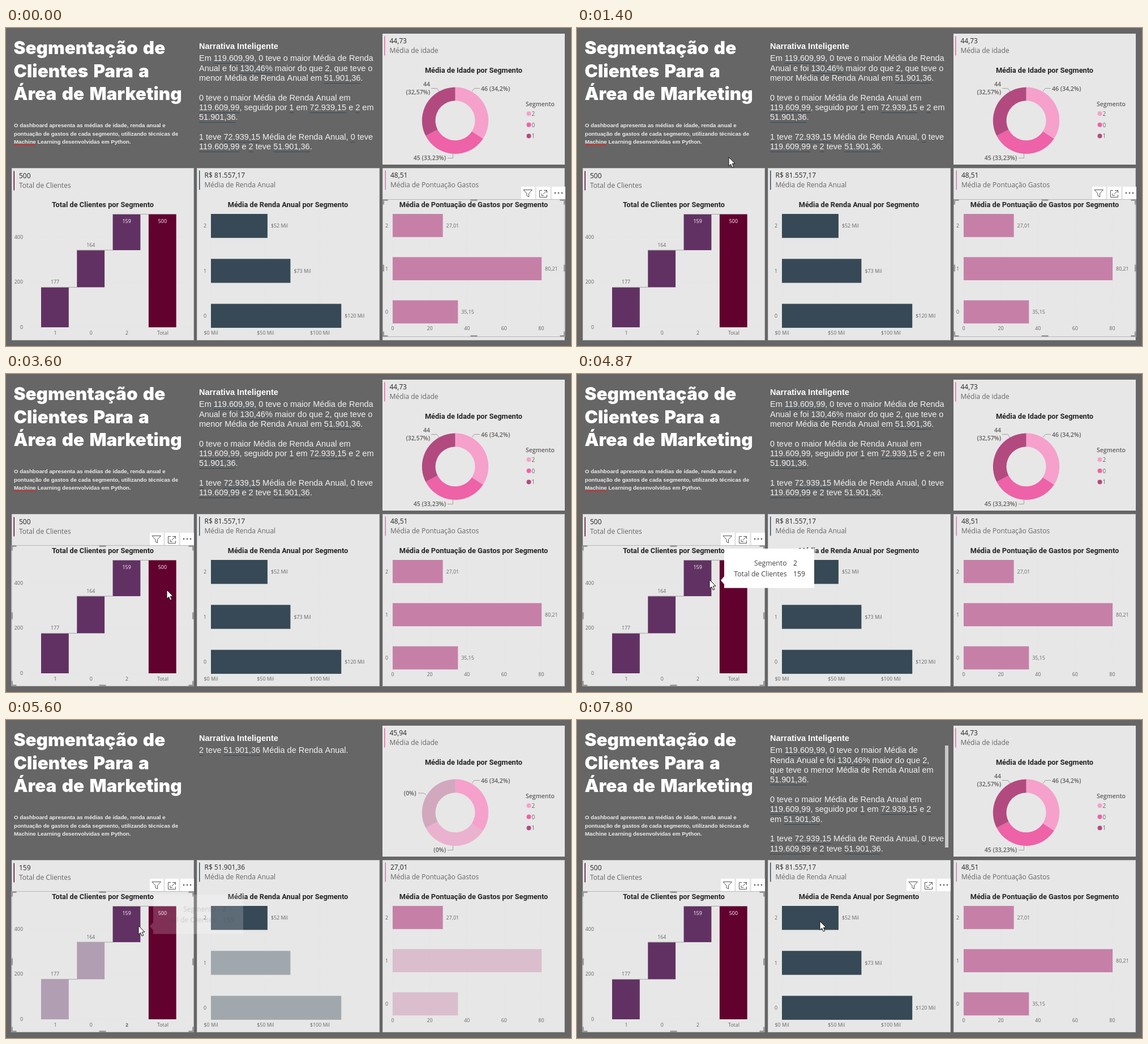
An HTML page with a canvas that plays this animation: 998 by 561 pixels, repeating every 8 s.

```html
<!DOCTYPE html>
<html lang="pt">
<head>
<meta charset="utf-8">
<title>Segmentação de Clientes</title>
<style>
html, body { margin: 0; width: 100%; height: 100%; overflow: hidden; background: #666; }
canvas { display: block; }
</style>
</head>
<body>
<canvas id="stage" width="998" height="561"></canvas>
<script>
const ctx = document.getElementById('stage').getContext('2d');
const LOOP = 8000, STEP = 1000 / 15, FADED = 0.4;
const SANS = '"Liberation Sans", Arial, sans-serif';
const UI = '"Open Sans", "Noto Sans", sans-serif';
const HEAD = '700 12.8px Roboto, sans-serif';
const AXIS = `8.9px ${UI}`, CARD = `12px ${UI}`, BOLD = `600 10.5px ${UI}`;
const PLUM = '#623163', WINE = '#62002e', SLATE = '#374956', MAUVE = '#c680a8';
const GREY = '#666', DARK = '#252423', PANEL = '#e7e7e7';

const NARRATIVE = {
  wide: ['Em 119.609,99, 0 teve o maior Média de Renda', 'Anual e foi 130,46% maior do que 2, que teve o',
    'menor Média de Renda Anual em 51.901,36.', '', '0 teve o maior Média de Renda Anual em',
    '119.609,99, seguido por 1 em 72.939,15 e 2 em', '51.901,36.', '',
    '1 teve 72.939,15 Média de Renda Anual, 0 teve', '119.609,99 e 2 teve 51.901,36.'],
  single: ['2 teve 51.901,36 Média de Renda Anual.'],
  narrow: ['Em 119.609,99, 0 teve o maior Média de', 'Renda Anual e foi 130,46% maior do que 2,',
    'que teve o menor Média de Renda Anual em', '51.901,36.', '', '0 teve o maior Média de Renda Anual em',
    '119.609,99, seguido por 1 em 72.939,15 e 2', 'em 51.901,36.', '',
    '1 teve 72.939,15 Média de Renda Anual, 0 teve', '119.609,99 e 2 teve 51.901,36.']
};

// time, x, y of the pointer tip
const POINTER = [[267, 1010, 561], [670, 620, 190], [1070, 500, 283], [1200, 500, 283], [1400, 268, 228],
  [2133, 268, 228], [2530, 284, 381], [4333, 284, 381], [4470, 234, 363], [7000, 234, 363], [7800, 429, 355]];

const within = (t, a, b) => t >= a && t < b;
const ramp = (t, a, b) => Math.max(0, Math.min(1, (t - a) / (b - a)));

function rect(x, y, w, h, color) {
  ctx.fillStyle = color;
  ctx.fillRect(x, y, w, h);
}

function text(str, x, y, font, color = GREY, align = 'left') {
  ctx.font = font;
  ctx.fillStyle = color;
  ctx.textAlign = align;
  ctx.fillText(str, x, Math.round(y));
}

function line(points, color, width = 1, dash = []) {
  ctx.beginPath();
  points.forEach(([x, y]) => ctx.lineTo(x, y));
  ctx.strokeStyle = color;
  ctx.lineWidth = width;
  ctx.setLineDash(dash);
  ctx.stroke();
  ctx.setLineDash([]);
}

function dot(x, y, r, color) {
  ctx.beginPath();
  ctx.arc(x, y, r, 0, Math.PI * 2);
  ctx.fillStyle = color;
  ctx.fill();
}

function withAlpha(alpha, draw) {
  ctx.save();
  ctx.globalAlpha = alpha;
  draw();
  ctx.restore();
}

function panel(x, y, w, h) {
  rect(x, y, w, h, PANEL);
  ctx.strokeStyle = '#c9c9c9';
  ctx.lineWidth = 1;
  ctx.strokeRect(x + 0.5, y + 0.5, w - 1, h - 1);
}

function card(x, y, value, label, color, busy) {
  rect(x - 9.5, y - 13, 1.5, 34, color);
  text(value, x, y, CARD, DARK);
  text(label, x, y + 16.5, CARD);
  if (busy) dot(x - 2.5, y - 3.5, 1.2, GREY);
}

function header(t) {
  const black = '900 31.5px Inter, "Liberation Sans", sans-serif';
  ctx.wordSpacing = '3px';
  ['Segmentação de', 'Clientes Para a', 'Área de Marketing'].forEach((s, i) =>
    text(s, 13.5, 46 + i * 40.5, black, '#fff'));
  ctx.wordSpacing = '0px';
  ['O dashboard apresenta as médias de idade, renda anual e',
    'pontuação de gastos de cada segmento, utilizando técnicas de',
    'Machine Learning desenvolvidas em Python.'].forEach((s, i) =>
    text(s, 14, 175.4 + i * 14.4, `700 9.7px ${SANS}`, '#ececec'));
  if (t < 5200) {
    const wave = Array.from({ length: 20 }, (_, i) => [14 + i * 2, 206 + i % 2]);
    line(wave, '#e02828', 1.4);
  }
}

function narrative(t) {
  const mode = t < 5270 ? 'wide' : t < 6800 ? 'single' : 'narrow';
  text('Narrativa Inteligente', 341, 36.5, `700 14.55px ${SANS}`, '#fff');
  NARRATIVE[mode].forEach((str, i) => {
    const y = Math.round(58.4 + i * 17.32);
    let x = 341;
    str.split(/(\d[\d.,]*\d%?|\d)/).forEach((part, k) => {
      text(part, x, y, `14.5px ${SANS}`, '#f2f2f2');
      const w = ctx.measureText(part).width;
      if (k % 2) rect(x, y + 4, w, 1, '#374956');
      x += w;
    });
  });
  if (mode === 'narrow') rect(650, 45, 6, 180, '#c8c8c8');
}

function donut(t, dim) {
  rect(665, 10, 322, 231, PANEL);
  const filtered = within(t, 5470, 7070), busy = within(t, 6730, 7070);
  card(677.5, 27.4, filtered ? '45,94' : '44,73', 'Média de idade', '#ee62a8', busy);
  if (busy) dot(675, 81, 1.2, GREY);
  text('Média de Idade por Segmento', 826, 79, HEAD, DARK, 'center');

  const parts = [['2', 0.342, '#f5a1cb'], ['0', 0.3323, '#ee62a8'], ['1', 0.3257, '#b24a80']];
  let angle = -Math.PI / 2;
  parts.forEach(([name, share, color], i) => {
    const end = angle + share * Math.PI * 2;
    withAlpha(i ? dim : 1, () => {
      ctx.beginPath();
      ctx.arc(793.5, 163.3, 58.7, angle, end);
      ctx.arc(793.5, 163.3, 35, end, angle, true);
      ctx.fillStyle = color;
      ctx.fill();
    });
    angle = end;
    dot(923.5, 151 + i * 19.7, 4, color);
    text(name, 928.5, 155 + i * 19.7, `10px ${UI}`);
  });
  text('Segmento', 918, 138, BOLD, '#605e5c');

  const none = within(t, 5270, 6800), leader = '#a0a0a0';
  text('46 (34,2%)', 839, 110.5, BOLD, '#605e5c');
  line([[823, 112], [827, 106.5], [837, 106.5]], leader);
  text(none ? '(0%)' : '45 (33,23%)', 777, 233, BOLD, '#605e5c', 'right');
  line([[780, 229.5], [789.5, 229.5], [789.5, 222]], leader);
  if (none) {
    text('(0%)', 724.5, 133, BOLD, '#605e5c', 'right');
    line([[728, 129], [738, 129], [742, 132]], leader);
  } else {
    text('44', 749, 103, BOLD, '#605e5c', 'right');
    text('(32,57%)', 749, 117, BOLD, '#605e5c', 'right');
    line([[751, 106.5], [761, 106.5], [765, 112]], leader);
  }
}

function waterfall(t) {
  panel(10, 247, 322, 304);
  const filtered = within(t, 5470, 7070), picked = within(t, 5200, 6730);
  card(23, 265.4, filtered ? '159' : '500', 'Total de Clientes', WINE, within(t, 6730, 7070));
  text('Total de Clientes por Segmento', 171, 315.5, HEAD, DARK, 'center');
  const yOf = v => 528 - v * 0.399;
  [0, 200, 400].forEach(v => {
    text(v, 30, yOf(v) + 3.2, AXIS, GREY, 'right');
    line([[40, yOf(v)], [326, yOf(v)]], '#dedede', 1, [1, 3]);
  });
  let base = 0;
  [['1', 177, PLUM], ['0', 164, PLUM], ['2', 159, PLUM], ['Total', 500, WINE]].forEach(([name, value, color], i) => {
    const x = 62 + i * 63.3, from = i === 3 ? 0 : base, top = yOf(from + value), inside = i > 1;
    withAlpha(picked && i < 2 ? FADED : 1, () => rect(x, top, 48.8, value * 0.399, color));
    text(value, x + 24.5, inside ? top + 15 : top - 6, AXIS, inside ? '#fff' : GREY, 'center');
    text(name, x + 25, 541, (picked && i === 2 ? '700 ' : '') + AXIS, GREY, 'center');
    if (i < 3) line([[x, top], [x + 63.3, top]], '#a6a6a6', 1);
    base += value;
  });
}

function barChart(o, t, dim) {
  panel(o.left, 247, o.width, 304);
  text(o.title, o.titleX, 315.5, HEAD, DARK, 'center');
  o.ticks.forEach(([v, label]) => {
    const x = o.x + v * o.scale;
    line([[x, 322], [x, 526]], '#dedede', 1, [1, 3]);
    text(label, x, o.tickY, AXIS, GREY, 'center');
  });
  const hideLabels = within(t, 5400, 6800);
  o.values.forEach(([v, label], i) => {
    const y = 328 + i * o.pitch, mid = y + o.height / 2;
    withAlpha(i ? dim : 1, () => rect(o.x, y, v * o.scale, o.height, o.color));
    text(2 - i, o.x - 8, mid + 3.2, AXIS, GREY, 'right');
    if (!i || !hideLabels) text(label, o.x + v * o.scale + 6, mid + 3.2, AXIS);
  });
}

const INCOME = {
  left: 337, width: 323, x: 362, scale: 1.925, pitch: 79.3, height: 42.3, color: SLATE, tickY: 541,
  title: 'Média de Renda Anual por Segmento', titleX: 498,
  values: [[51.9, '$52 Mil'], [72.94, '$73 Mil'], [119.61, '$120 Mil']],
  ticks: [[0, '$0 Mil'], [50, '$50 Mil'], [100, '$100 Mil']]
};
const SPENDING = {
  left: 665, width: 322, x: 683, scale: 3.28, pitch: 76.2, height: 40.8, color: MAUVE, tickY: 533,
  title: 'Média de Pontuação de Gastos por Segmento', titleX: 826,
  values: [[27.01, '27,01'], [80.21, '80,21'], [35.15, '35,15']],
  ticks: [0, 20, 40, 60, 80].map(v => [v, v])
};

function toolbar(right) {
  const x = right - 78;
  [0, 27, 54].forEach(d => rect(x + d, 280, 24, 22, '#fff'));
  line([[x + 4, 285.5], [x + 19.5, 285.5], [x + 13.5, 292], [x + 13.5, 298],
    [x + 10, 296], [x + 10, 292], [x + 4, 285.5]], '#555');
  line([[x + 37, 286.5], [x + 32.5, 286.5], [x + 32.5, 298.5], [x + 45.5, 298.5], [x + 45.5, 294]], '#555');
  line([[x + 40, 286.5], [x + 45.5, 286.5], [x + 45.5, 291]], '#555');
  line([[x + 39, 293], [x + 45.5, 286.5]], '#555');
  line([[x + 36, 292], [x + 36, 295.5], [x + 40, 295.5]], '#555');
  [60, 66, 72].forEach(d => dot(x + d, 291, 1.3, '#555'));
}

function selection(x, y, w, h) {
  const color = '#999';
  ctx.strokeStyle = '#b8b8b8';
  ctx.lineWidth = 1;
  ctx.strokeRect(x + 0.5, y + 0.5, w - 1, h - 1);
  const l = x + 1.5, r = x + w - 1.5, top = y + 1.5, b = y + h - 1.5, s = 8;
  [[l, top, 1, 1], [r, top, -1, 1], [l, b, 1, -1], [r, b, -1, -1]].forEach(([cx, cy, dx, dy]) =>
    line([[cx, cy + s * dy], [cx, cy], [cx + s * dx, cy]], color, 3));
  [top, b].forEach(cy => line([[x + w / 2 - 6, cy], [x + w / 2 + 6, cy]], color, 3));
  [l, r].forEach(cx => line([[cx, y + h / 2 - 6], [cx, y + h / 2 + 6]], color, 3));
}

function tooltip(x, y, w, segment, count, alpha) {
  if (alpha <= 0) return;
  withAlpha(alpha, () => {
    rect(x, y, w, 69.5, '#fff');
    ctx.beginPath();
    [[x, y + 49], [x - 6, y + 56], [x, y + 63]].forEach(p => ctx.lineTo(...p));
    ctx.fill();
    const font = `12.2px ${UI}`;
    [['Segmento', segment], ['Total de Clientes', count]].forEach(([label, value], i) => {
      text(label, x + 110.5, y + 30.4 + i * 18.5, font, '#444', 'right');
      text(value, x + 122, y + 30.4 + i * 18.5, font, '#333');
    });
  });
}

function pointer(t) {
  if (t < 330) return;
  const last = POINTER[POINTER.length - 1];
  const next = POINTER.findIndex(p => p[0] > t);
  let [, x, y] = last;
  if (next > 0) {
    const [t0, x0, y0] = POINTER[next - 1], [t1, x1, y1] = POINTER[next];
    const k = ramp(t, t0, t1), e = k * k * (3 - 2 * k);
    x = x0 + (x1 - x0) * e;
    y = y0 + (y1 - y0) * e;
  }
  ctx.beginPath();
  [[0, 0], [0, 15.5], [3.6, 12.2], [6.2, 18], [8.8, 17], [6.3, 11.2], [11, 11]].forEach(([dx, dy]) =>
    ctx.lineTo(x + dx, y + dy));
  ctx.closePath();
  ctx.fillStyle = '#fff';
  ctx.fill();
  ctx.strokeStyle = '#111';
  ctx.lineWidth = 1;
  ctx.stroke();
}

function draw(t) {
  const highlight = ramp(t, 5270, 5530) - ramp(t, 7000, 7270);
  const dim = 1 - (1 - FADED) * highlight;
  const filtered = within(t, 5470, 7070), busy = within(t, 6730, 7070);
  rect(0, 0, 998, 561, '#666');
  header(t);
  narrative(t);
  donut(t, dim);
  waterfall(t);
  barChart(INCOME, t, dim);
  card(350.5, 264.4, filtered ? 'R$ 51.901,36' : 'R$ 81.557,17', 'Média de Renda Anual', SLATE, busy);
  if (busy) dot(347.5, 318, 1.2, GREY);
  barChart(SPENDING, t, dim);
  card(679, 264.4, filtered ? '27,01' : '48,51', 'Média de Pontuação Gastos', MAUVE, busy);
  if (within(t, 5270, 5400)) dot(673, 316.5, 1.2, GREY);

  if (t < 1870) selection(665, 302, 323, 243);
  if (t < 1930) toolbar(988);
  if (t >= 3130) selection(9, 302, 323, 249);
  if (t >= 2400) toolbar(332);
  if (t >= 7400) toolbar(660);

  if (t >= 2930) tooltip(311, 324, 164, 'Total', 500, 1 - ramp(t, 3267, 3600));
  if (t >= 4870) tooltip(260, 308, 159, '2', 159, 1 - ramp(t, 5333, 5667));
  pointer(t);
}

function tick() {
  const t = performance.now() % LOOP;
  // the screen refreshes fifteen times a second
  draw(Math.floor((t + 4) / STEP) * STEP + 4);
  requestAnimationFrame(tick);
}
tick();
</script>
</body>
</html>
```
